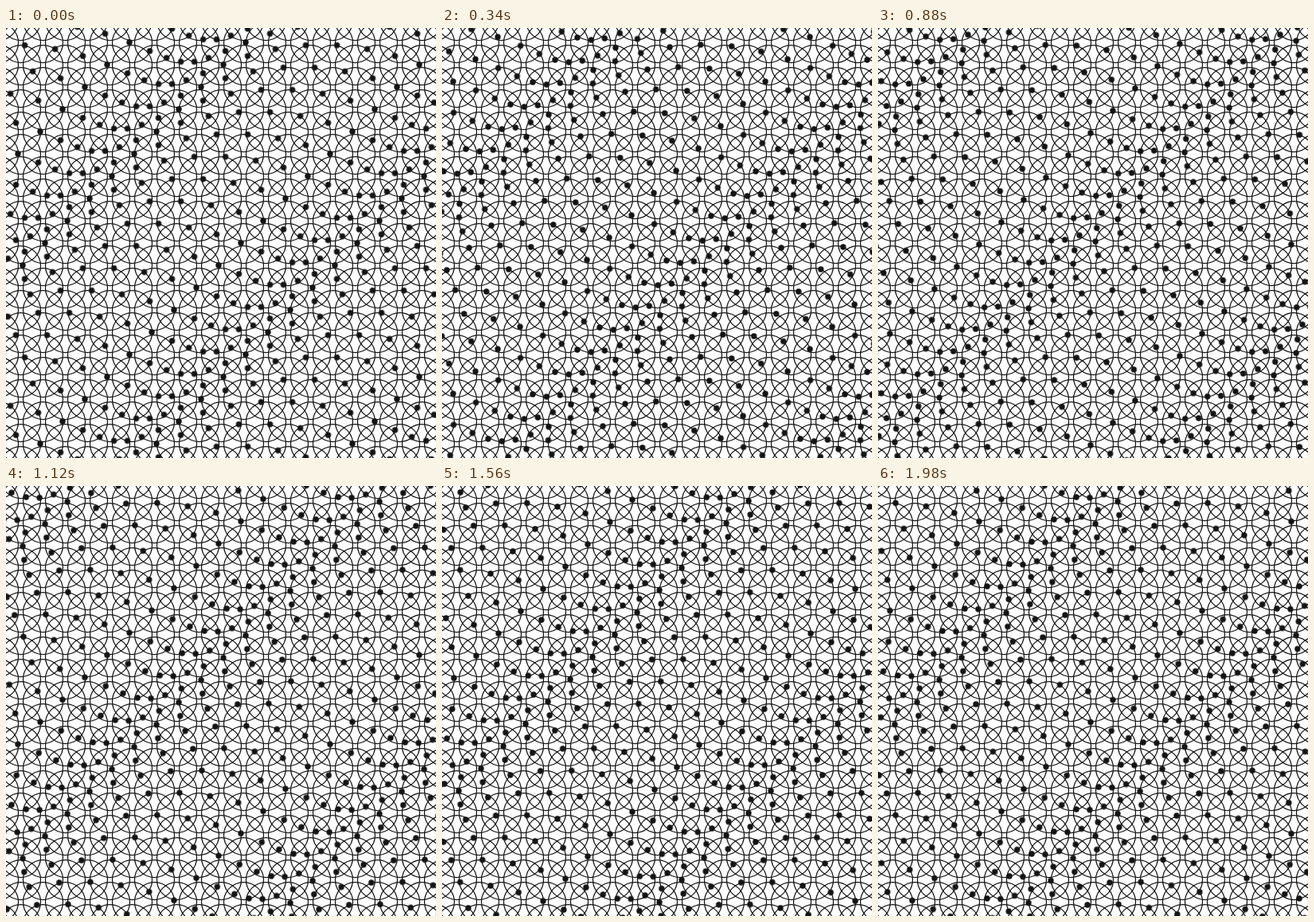
Recreate the animation shown at these times as an HTML page. Size 540x540 px, loop 2000 ms.

```html
<!DOCTYPE html>
<html lang="en">
<head>
<meta charset="utf-8">
<title>Orbiting dots</title>
<style>
  html, body { margin: 0; width: 100%; height: 100%; overflow: hidden; background: #fff; }
  svg { display: block; width: 540px; height: 540px; }
  /* Half a pixel keeps the ring edges crisp. */
  .rings { fill: none; stroke: #141414; stroke-width: 1.25; transform: translate(0.5px, 0.5px); }
  .dots { fill: #141414; animation: orbit 2s linear infinite; }
  @keyframes orbit {
    from { transform: rotate(0turn) translate(25px) rotate(0turn); }
    to { transform: rotate(1turn) translate(25px) rotate(-1turn); }
  }
</style>
</head>
<body>
<svg viewBox="0 0 540 540"></svg>
<script>
  const NS = "http://www.w3.org/2000/svg";
  const MID = 270, GAP = 28, RADIUS = 25, DOT = 3.7;
  const REACH = 11, PHASES = 14, LOOP = 2000;

  function add(parent, tag, attrs) {
    const el = document.createElementNS(NS, tag);
    for (const key in attrs) el.setAttribute(key, attrs[key]);
    return parent.appendChild(el);
  }

  const svg = document.querySelector("svg");
  const rings = add(svg, "g", { class: "rings" });

  // Dots sharing a phase move together, so each phase is one group.
  const groups = Array.from({ length: PHASES }, (_, n) =>
    add(svg, "g", { class: "dots", style: `animation-delay: ${-LOOP * n / PHASES}ms` }));

  for (let row = -REACH; row <= REACH; row++) {
    for (let col = -REACH; col <= REACH; col++) {
      const cx = MID + GAP * col, cy = MID + GAP * row;
      const phase = (row + col + 2 * PHASES) % PHASES;
      add(rings, "circle", { cx, cy, r: RADIUS });
      add(groups[phase], "circle", { cx, cy, r: DOT });
    }
  }
</script>
</body>
</html>
```
